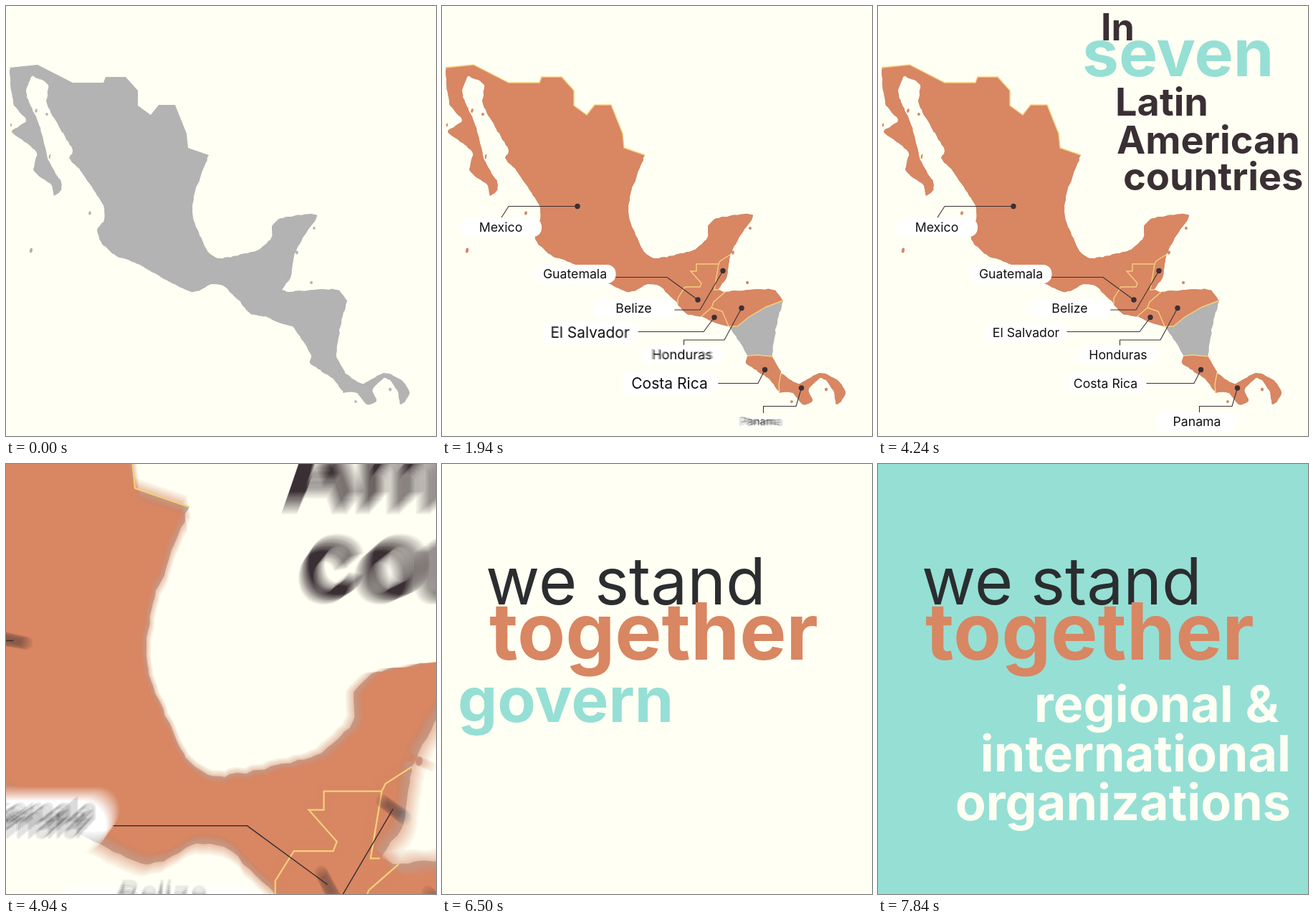
An HTML page with a canvas that plays this animation: 600x600 px, repeating every 8000 ms.

```html
<!DOCTYPE html>
<html lang="en">
<head>
<meta charset="utf-8">
<title>We stand together</title>
<style>
  html, body { margin: 0; width: 100%; height: 100%; overflow: hidden; background: #fffff3; }
  canvas { display: block; width: 600px; height: 600px; }
</style>
</head>
<body>
<canvas id="stage" width="600" height="600"></canvas>
<script>
const LOOP = 8000;
const CREAM = '#fffff3', GRAY = '#b3b3b3', ORANGE = '#d98662', TEAL = '#96dfd5',
      YELLOW = '#f5d07c', DARK = '#3a3034', INK = '#2b2d2f';
const FONT = 'Inter, "Open Sans", sans-serif';

const out = document.getElementById('stage').getContext('2d');
const layer = document.createElement('canvas');
layer.width = layer.height = 600;
const ctx = layer.getContext('2d');

const clamp = v => Math.min(1, Math.max(0, v));
const smooth = v => (v = clamp(v), v * v * (3 - 2 * v));
const ramp = (t, start, length) => clamp((t - start) / length);

let seed = 7;
const random = () => (seed = seed * 16807 % 2147483647) / 2147483647;

const points = s => s.split(' ').map(p => p.split(',').map(Number));

// Spline through a few key points, roughened like a shoreline
function coast(keys) {
  const p = points(keys), result = [p[0]];
  for (let i = 1; i < p.length; i++) {
    const a = p[i - 1], b = p[i], before = p[i - 2] || a, after = p[i + 1] || b;
    const steps = Math.ceil(Math.hypot(b[0] - a[0], b[1] - a[1]) / 4);
    for (let j = 1; j <= steps; j++) {
      const u = j / steps, rough = j < steps ? 1.5 : 0;
      result.push(a.map((_, k) => {
        const from = (b[k] - before[k]) * .35, to = (after[k] - a[k]) * .35;
        const e = u * u * (3 - 2 * u);
        return a[k] + (b[k] - a[k]) * e + from * u * (1 - u) ** 2 - to * u * u * (1 - u)
          + rough * (random() - .5);
      }));
    }
  }
  return result;
}

const border = {
  north: points('5,86 44,82 93,107 136,107 139,99 167,99 184,118 184,139 202,152 213,138 236,138 252,178 254,198 283,208'),
  mexBel: points('402,347 388,356 386,360'),
  mexGua: points('386,360 355,360 355,370 347,370 362,387 360,392 339,392 329,408 329,416'),
  belGua: points('386,360 380,396 385,396'),
  guaHon: points('395,399 379,413 376,421'),
  guaSal: points('376,421 362,433'),
  salHon: points('376,421 391,426 400,447'),
  honNic: points('476,411 452,420 428,434 412,447 400,447'),
  nicCos: points('461,489 440,487 426,488'),
  cosPan: points('473,512 470,528 471,540')
};
const shore = {
  baja: coast('44,101 36,98 28,118 32,134 44,160 52,186 59,215 77,246 76,258 67,265 62,248 39,230 43,206 31,193 8,175 28,160 10,135 5,86'),
  gulf: coast('283,208 263,262 260,287 263,302 281,342 300,352 350,341 370,324 371,307 384,296 433,291 418,318 402,347'),
  pacific: coast('329,416 304,391 287,388 262,399 232,387 180,358 154,349 134,332 127,312 137,298 134,275 104,230 88,212 93,202 76,172 57,136 59,110 44,101'),
  belize: coast('402,347 398,376 385,396'),
  guaNorth: coast('385,396 395,399'),
  guaSouth: coast('362,433 342,430 329,416'),
  salvador: coast('400,447 376,440 362,433'),
  honduras: coast('395,399 430,396 462,396 476,411'),
  nicEast: coast('476,411 466,449 461,489'),
  nicWest: coast('426,488 414,467 400,447'),
  cosEast: coast('461,489 473,512'),
  cosWest: coast('471,540 458,522 436,507 424,498 426,488'),
  panama: coast('473,512 497,527 527,512 552,522 563,541 551,556 546,536 530,519 512,534 517,551 503,556 490,540 471,540')
};
const islands = points('42,146 57,151 7,166 61,210 117,289 35,341 430,310 406,344 426,386 488,552 536,535');

const back = list => [...list].reverse();
const stroke = list => new Path2D('M' + list.join(' '));
const shape = (...parts) => new Path2D('M' + parts.flat().join(' ') + 'Z');

const { north, mexBel, mexGua, belGua, guaHon, guaSal, salHon, honNic, nicCos, cosPan } = border;
const mexico = shape(shore.baja, north, shore.gulf, mexBel, mexGua, shore.pacific);
for (const [x, y] of islands) {
  mexico.moveTo(x, y);
  mexico.ellipse(x, y, 1 + random(), 1.5 + 2 * random(), .2, 0, 7);
}
const nicaragua = shape(shore.nicEast, nicCos, shore.nicWest, back(honNic));

// The arm runs from the dot, which is also the pivot of the pop, to the label
const country = (name, path, arm, x, y) =>
  ({ name, path, arm: stroke(points(arm)), dot: points(arm)[0], label: [x, y] });
const countries = [
  country('Mexico', mexico, '189,279.5 93,279.5 83,295', 82, 309),
  country('Guatemala', shape(belGua, shore.guaNorth, guaHon, guaSal, shore.guaSouth, back(mexGua)),
    '357,410 314,378.5 242,378.5', 185.5, 374),
  country('Belize', shape(shore.belize, back(belGua), back(mexBel)),
    '392,369.5 360,424 321,424', 267.5, 421.5),
  country('Honduras', shape(shore.honduras, honNic, back(salHon), back(guaHon)),
    '418,421.5 394,466 337.5,466 337.5,474', 335, 486.5),
  country('El Salvador', shape(salHon, shore.salvador, back(guaSal)),
    '380,434.5 365,454.5 262,454.5', 206.5, 456),
  country('Costa Rica', shape(shore.cosEast, cosPan, shore.cosWest, back(nicCos)),
    '450.5,507.5 441,526.5 372,526.5', 317.5, 526.5),
  country('Panama', shape(shore.panama, back(cosPan)),
    '501.5,533 494,558.5 448.5,558.5 448.5,568', 445, 580)
];
const borders = Object.values(border).map(stroke);

const word = (text, x, y, size, color, start, weight = 700, align = 'left') =>
  ({ text, x, y, size, color, start, weight, align });
const headline = [
  word('In', 311, 48, 52, DARK, 2720),
  word('seven', 285, 98, 91, TEAL, 3005),
  word('Latin', 331, 153, 54, DARK, 3290),
  word('American', 333, 206, 54, DARK, 3575),
  word('countries', 342, 257, 54, DARK, 3860)
];
const closing = [
  word('we', 61, 196, 92, INK, 5320, 400),
  word('stand', 213, 196, 91, INK, 5483, 400),
  word('together', 66, 273, 109.5, ORANGE, 5600),
  ...['regional & ', 'international', 'organizations'].map((text, i) =>
    word(text, 576, 360 + 68.5 * i, 70, CREAM, 7290 + 70 * i, 700, 'right'))
];
const typing = word('governments', 22, 360, 87.5, TEAL);

const zoom = t => Math.exp(3.5 * smooth((t - 4700) / 700));

// Grow past full size, hold, settle
function pop(u, peak) {
  return peak * smooth(u / .4) - (peak - 1) * smooth((u - .8) / .2);
}

function view(scale) {
  const shift = 300 - 300 * scale;
  ctx.setTransform(scale, 0, 0, scale, shift, shift);
}

function scaledAt([x, y], scale, draw) {
  if (scale <= 0) return;
  ctx.save();
  ctx.translate(x, y);
  ctx.scale(scale, scale);
  ctx.translate(-x, -y);
  draw();
  ctx.restore();
}

function write({ text, x, y, size, color, weight, align }) {
  ctx.font = `${weight} ${size}px ${FONT}`;
  ctx.fillStyle = color;
  ctx.textAlign = align;
  ctx.fillText(text, x, y);
}

function slideIn(words, t) {
  for (const w of words) {
    if (t <= w.start) continue;
    const left = 1 - ramp(t, w.start, 400);
    write({ ...w, x: w.x + 550 * left ** 3 });
  }
}

function drawLabel({ name, label }, t, i) {
  const [x, y] = label;
  scaledAt(label, pop(ramp(t, 1540 + 1.45 * i ** 3, 380), 1.19), () => {
    ctx.fillStyle = '#fff';
    ctx.beginPath();
    ctx.roundRect(x - 57, y - 13, 114, 26, 12);
    ctx.fill();
    write(word(name, x, y + 6, 17.7, '#111', 0, 400, 'center'));
  });
}

// Base land and thin lines follow the frame time, everything else the sample time
function drawMap(t, frameTime) {
  const steady = zoom(frameTime), moving = zoom(t);
  view(steady);
  ctx.fillStyle = ctx.strokeStyle = GRAY;
  ctx.lineWidth = 1;
  for (const c of countries) ctx.fill(c.path);
  ctx.fill(nicaragua);
  if (t < 1500) for (const b of borders.slice(1)) ctx.stroke(b);

  view(moving);
  ctx.fillStyle = ORANGE;
  countries.forEach((c, i) => {
    const peak = c.path === mexico ? 1.04 : 1.19;
    scaledAt(c.dot, pop(ramp(t, 690 + 70 * i, 380), peak), () => ctx.fill(c.path));
  });

  view(steady);
  ctx.strokeStyle = YELLOW;
  ctx.lineWidth = 1.4 / steady ** .5;
  ctx.globalAlpha = ramp(t, 950, 450);
  for (const b of borders) ctx.stroke(b);
  ctx.globalAlpha = 1;
  const grown = ramp(t, 1540, 220);
  if (grown > 0) {
    ctx.strokeStyle = DARK;
    ctx.lineWidth = 1.1 / steady ** .7;
    ctx.setLineDash([170 * grown, 500]);
    for (const c of countries) ctx.stroke(c.arm);
    ctx.setLineDash([]);
  }

  view(moving);
  ctx.fillStyle = DARK;
  for (const c of countries) {
    ctx.beginPath();
    ctx.arc(...c.dot, 3.7 * grown, 0, 7);
    ctx.fill();
  }
  countries.forEach((c, i) => drawLabel(c, t, i));
  slideIn(headline, t);
}

function drawScene(t, frameTime) {
  view(1);
  ctx.fillStyle = CREAM;
  ctx.fillRect(0, 0, 600, 600);
  if (frameTime < 5400) drawMap(t, frameTime);
  view(1);
  ctx.globalAlpha = ramp(t, 7250, 220);
  ctx.fillStyle = TEAL;
  ctx.fillRect(0, 0, 600, 600);
  ctx.globalAlpha = 1;
  const typed = Math.max(0, Math.floor((t - 6180) / 53));
  if (t < 7480) write({ ...typing, text: typing.text.slice(0, typed) });
  slideIn(closing, t);
}

const moves = [[690, 2260], [2700, 4290], [4690, 6030], [7240, 7840]];

// Motion blur: average several moments around the frame time
function render(t) {
  const busy = moves.some(([a, b]) => t > a && t < b);
  const samples = busy ? 16 : 1;
  const shutter = t > 4690 && t < 5300 ? 20 : 44;
  for (let k = 0; k < samples; k++) {
    const offset = busy ? ((k + .5) / samples - .5) * shutter : 0;
    drawScene(t + offset, t);
    out.globalAlpha = 1 / (k + 1);
    out.drawImage(layer, 0, 0);
  }
}

const begin = performance.now();
function tick() {
  render((performance.now() - begin) % LOOP);
  requestAnimationFrame(tick);
}
tick();
</script>
</body>
</html>
```
